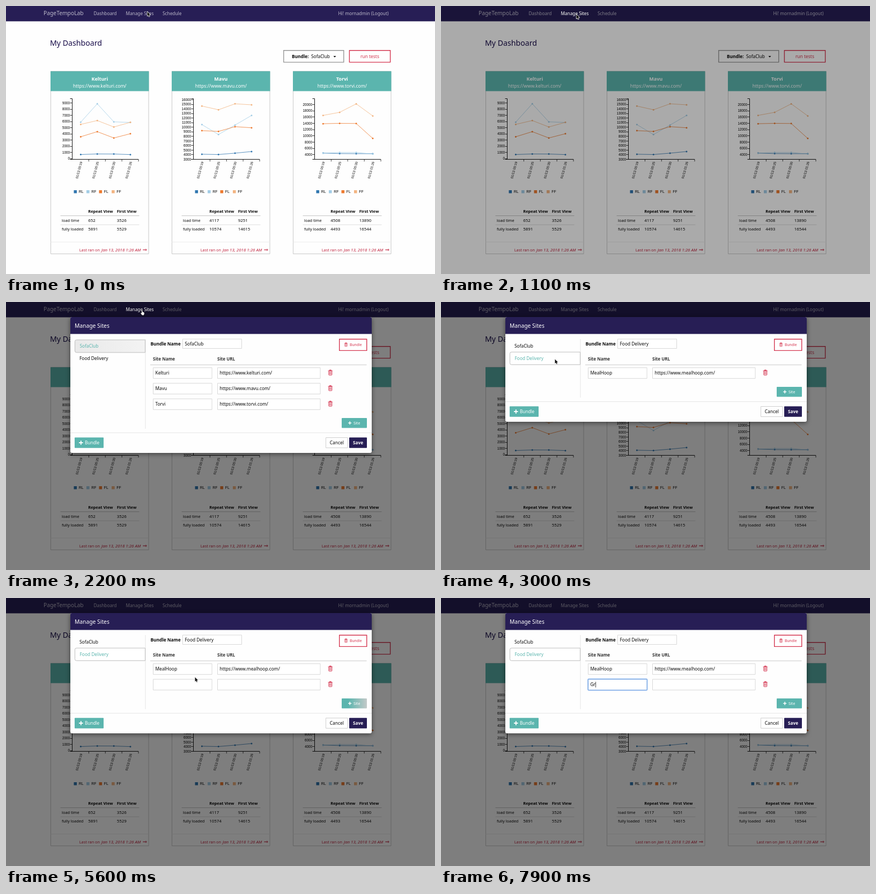
Animation, 800 px wide and 499 px high, one loop 8000 ms. Source, as an HTML page with a canvas:

```html
<!DOCTYPE html>
<html lang="en">
<head>
<meta charset="utf-8">
<title>Site dashboard</title>
<style>
  html, body { margin: 0; width: 100%; height: 100%; overflow: hidden; background: #fefefe; }
  canvas { display: block; width: 800px; height: 499px; }
</style>
</head>
<body>
<canvas id="stage"></canvas>
<script>
const W = 800, H = 499, LOOP = 8000, STEP = 100;
const NAVY = '#271e55', TEAL = '#5bb5ae', RED = '#d4344f', INK = '#080808';
const UI = '"Noto Sans", "Open Sans", sans-serif';
const CHART = '"Liberation Sans", Arial, sans-serif';
const SERIES = [['RL', '#3177b0'], ['RF', '#a3cde6'], ['FL', '#ee7b30'], ['FF', '#f3b582']];
const STAMPS = ['00:19', '00:25', '00:30', '01:26'];
const BUNDLES = [
  { name: 'SofaClub', sites: ['Kelturi', 'Mavu', 'Torvi'] },
  { name: 'Food Delivery', sites: ['MealHoop'] }
];
// Per card: tick range, the pixel row of the lowest tick, pixels per unit, four series.
const CARDS = [
  { x: 83.5, lo: 0, hi: 9000, step: 1000, base: 284, k: .0115, data: [
    [652, 740, 730, 640], [5891, 8860, 5940, 5840], [3526, 4350, 3330, 4020], [5529, 6150, 5110, 5860]] },
  { x: 309.5, lo: 3000, hi: 16000, step: 1000, base: 285.5, k: .00854, data: [
    [4117, 4050, 4350, 4700], [10574, 8410, 10470, 12570], [9251, 9090, 10120, 9885], [14615, 13810, 15110, 14885]] },
  { x: 535.5, lo: 4000, hi: 20000, step: 2000, base: 276.8, k: .00583, data: [
    [4508, 4340, 4310, 4310], [4493, 4690, 4690, 4220], [13890, 14000, 13950, 9180], [16544, 17520, 20230, 16370]] }
];
// Pointer stops: time, x, y
const PATH = [[0, 263, 10], [500, 252, 15], [2300, 252, 15], [2800, 212, 106], [3700, 212, 106],
  [4600, 647, 167], [5100, 647, 167], [5600, 352, 147], [5900, 338, 160]];

const dpr = window.devicePixelRatio || 1;
const stage = document.getElementById('stage');
const layer = document.createElement('canvas');
for (const cv of [stage, layer]) {
  cv.width = W * dpr;
  cv.height = H * dpr;
  cv.getContext('2d').scale(dpr, dpr);
}
const view = stage.getContext('2d');
let c = view;

const clamp = v => Math.max(0, Math.min(1, v));
const smooth = p => p * p * (3 - 2 * p);
const url = name => `https://www.${name.toLowerCase()}.com/`;

function text(s, x, y, size, color, font = '', align = 'left', family = UI) {
  c.font = `${font} ${size}px ${family}`;
  c.textAlign = align;
  c.textBaseline = 'alphabetic';
  c.fillStyle = color;
  c.fillText(s, x, y);
}

function line(x1, y1, x2, y2, color, width = 1) {
  c.strokeStyle = color;
  c.lineWidth = width;
  c.beginPath();
  c.moveTo(x1, y1);
  c.lineTo(x2, y2);
  c.stroke();
}

function box(x, y, w, h, fill, stroke, width = 1, radius = 0) {
  c.beginPath();
  c.roundRect(x, y, w, h, radius);
  if (fill) { c.fillStyle = fill; c.fill(); }
  if (stroke) { c.strokeStyle = stroke; c.lineWidth = width; c.stroke(); }
}

function plus(x, y, r, width) {
  line(x - r, y, x + r, y, '#fff', width);
  line(x, y - r, x, y + r, '#fff', width);
}

function trash(x, y, s = 1) {
  c.save();
  c.translate(x, y);
  c.scale(s, s);
  box(-3, -2.6, 6, 7.4, null, RED, 1, .8);
  line(-4.2, -3.2, 4.2, -3.2, RED, 1);
  box(-1.5, -4.9, 3, 1.7, null, RED, .9);
  for (const d of [-1.3, 0, 1.3]) line(d, -1.2, d, 3.4, RED, .7);
  c.restore();
}

function chart(card) {
  const ax = card.x + 40, right = ax + 123.5, gap = 123.5 / 4;
  const py = v => card.base - (v - card.lo) * card.k;
  const px = i => ax + .4 + gap * (i + .5);
  line(ax, 172.5, ax, 286, '#111');
  line(ax - 4, 172.5, ax, 172.5, '#111');
  line(ax - 4, 285.5, right, 285.5, '#111');
  for (let v = card.lo; v <= card.hi; v += card.step) {
    const y = Math.floor(py(v)) + .5;
    line(ax - 4, y, ax, y, '#111', .8);
    text(v, ax - 4.5, py(v) + 2.2, 6.3, '#000', '', 'right', CHART);
  }
  for (let i = 1; i <= 4; i++) line(ax + gap * i, 285.5, ax + gap * i, 289.5, '#111', .8);
  STAMPS.forEach((s, i) => {
    c.save();
    c.translate(px(i) + .8, 290);
    c.rotate(-75 * Math.PI / 180);
    text('01/13 ' + s, 0, 2.2, 6.1, '#000', '', 'right', CHART);
    c.restore();
  });
  SERIES.forEach(([name, color], n) => {
    const ys = card.data[n].map(py);
    c.beginPath();
    ys.forEach((y, i) => c.lineTo(px(i), y));
    c.strokeStyle = color;
    c.lineWidth = .8;
    c.stroke();
    c.fillStyle = color;
    ys.forEach((y, i) => {
      c.beginPath();
      c.arc(px(i), y, 1.5, 0, 7);
      c.fill();
    });
    const lx = card.x + 43 + n * 23.5;
    box(lx, 343, 5.6, 5.6, color);
    text(name, lx + 9.3, 348.2, 6.8, '#000', '', 'left', CHART);
  });
}

function drawCard(card, i) {
  const { x, data } = card, name = BUNDLES[0].sites[i];
  box(x, 121.5, 182.5, 340, '#fefefe', '#c8c8c8');
  box(x - .5, 121.5, 183.5, 37, TEAL);
  text(name, x + 91.3, 139, 9, '#fff', 'bold', 'center');
  text(url(name), x + 91.3, 152.2, 8.5, '#fff', '', 'center');
  chart(card);
  text('Repeat View', x + 69.7, 385, 7.5, INK, 'bold');
  text('First View', x + 123.2, 385, 7.5, INK, 'bold');
  line(x + 18, 390.5, x + 165, 390.5, '#c4c4c4');
  line(x + 18, 407.3, x + 165, 407.3, '#dedede');
  ['load time', 'fully loaded'].forEach((label, r) => {
    const y = 402 + r * 16.2;
    text(label, x + 20.5, y, 7.4, INK);
    text(data[r][0], x + 69.7, y, 7.9, INK);
    text(data[2 + r][0], x + 123.2, y, 7.9, INK);
  });
  line(x, 439.5, x + 182.5, 439.5, '#ececec');
  text('Last ran on', x + 91.5, 457, 7.3, '#c0243f', '', 'right');
  text('Jan 13, 2018 1:26 AM', x + 168, 457, 7.9, '#c0243f', 'italic', 'right');
  text('⇒', x + 171.3, 457, 10, '#c0243f', '', 'left', '"DejaVu Sans", sans-serif');
}

function drawPage() {
  box(0, 0, W, H, '#fefefe');
  box(0, 0, W, 28.4, NAVY);
  const grey = '#bcb9ca';
  text('PageTempoLab', 70, 17, 10.3, grey);
  text('Dashboard', 163.5, 16.5, 8.3, grey);
  text('Manage Sites', 223.5, 16.5, 8.25, grey);
  text('Schedule', 292, 16.5, 8.3, grey);
  text('Hi! mornadmin (Logout)', 713.5, 16.5, 8.35, grey, '', 'right');
  text('My Dashboard', 82, 74, 14.15, '#170b48');
  box(517.8, 82.8, 112, 21.8, null, '#959595', 1.4);
  text('Bundle:', 533, 97, 8.3, INK, 'bold');
  text(BUNDLES[0].name, 569, 97, 8.4, INK);
  c.beginPath();
  c.moveTo(610.5, 93);
  c.lineTo(615.5, 93);
  c.lineTo(613, 95.8);
  c.fill();
  box(640.4, 82.8, 76.2, 21.8, null, RED, 1.4);
  text('run tests', 678.4, 97, 8.45, RED, '', 'center');
  CARDS.forEach(drawCard);
}

function field(x, y, w, value, focus) {
  if (focus) box(x, y, w, 20, '#fff', '#a9c8f2', 3, 1.5);
  box(x, y, w, 20, '#fff', focus ? '#6d9fe0' : '#d8d8d8');
  text(value, x + 4, y + 13, 8.35, INK);
}

function drawModal(t) {
  const active = t < 2900 ? 0 : 1, bundle = BUNDLES[active];
  const sites = bundle.sites.slice();
  if (t >= 5000) sites.push('');
  const last = 132 + 29 * (sites.length - 1);
  const typed = t < 7300 ? '' : t < 7700 ? 'G' : 'Gr';

  c.save();
  c.shadowColor = 'rgba(0,0,0,.5)';
  c.shadowBlur = 8 * dpr;
  c.shadowOffsetY = 2 * dpr;
  box(120, 28, 562, last + 63, '#fefefe', null, 1, 3);
  c.restore();
  box(120, 28, 562, 31.5, NAVY, null, 1, [3, 3, 0, 0]);
  text('Manage Sites', 128, 47.5, 10.3, '#fff', '500');

  line(260, 69, 260, last + 46, '#e4e4e4');
  const ty = active ? 93.2 : 70.5;
  let fill = '#fff';
  if (!active) {
    fill = c.createLinearGradient(128, 0, 260, 0);
    fill.addColorStop(0, '#e9e9e9');
    fill.addColorStop(1, '#f3f3f3');
  }
  box(128.5, ty, 131, 23.5, fill, '#bdbdbd', 1, [3, 0, 0, 3]);
  BUNDLES.forEach((b, i) => {
    const on = i === active;
    text(b.name, on ? 137.5 : 137, 84.8 + i * 23.2, 8.35, on ? TEAL : INK);
  });

  text('Bundle Name', 269.5, 81, 8.3, INK, 'bold');
  box(329.5, 69, 110, 17.5, '#fff', '#d8d8d8');
  text(bundle.name, 333.5, 81, 8.35, INK);
  box(621.7, 69.2, 51, 21.2, '#fff', RED, 1.4);
  trash(634, 79.3, .72);
  text('Bundle', 641, 82, 6.8, RED);
  text('Site Name', 274, 109, 8, '#333', 'bold');
  text('Site URL', 394, 109, 8, '#333', 'bold');
  line(269, 117, 672.5, 117, '#c8c8c8');

  sites.forEach((name, i) => {
    const y = 122 + 29 * i, fresh = !name, focus = fresh && t >= 6000;
    field(274.5, y + .3, 109.5, fresh ? typed : name, focus);
    field(394.5, y + .3, 191.5, fresh ? '' : url(name));
    trash(604.8, y + 9.3);
    const blinkOn = t >= 7300 || Math.floor((t - 6000) / 500) % 2 === 0;
    if (focus && blinkOn) {
      c.font = `8.35px ${UI}`;
      const cx = 279 + c.measureText(typed).width;
      line(cx, y + 5, cx, y + 15.5, '#111', .8);
    }
  });

  let site = TEAL;
  if (t >= 4600 && t < 6000) {
    site = c.createLinearGradient(626, 0, 673, 0);
    site.addColorStop(.25, TEAL);
    site.addColorStop(1, '#c3c9c8');
  }
  box(626, last + 26, 47, 18.5, site, null, 1, 1);
  plus(641.2, last + 35.3, 3, 1.5);
  text('Site', 648, last + 38, 7.2, '#fff', '500');

  line(120, last + 53.5, 682, last + 53.5, '#e6e6e6');
  box(128, last + 62.3, 54, 19.5, TEAL, null, 1, 1);
  plus(139.8, last + 72, 3.8, 1.9);
  text('Bundle', 147, last + 75, 8.2, '#fff', '500');
  box(596.5, last + 62.5, 40.5, 19, '#fff', '#cfcfcf');
  text('Cancel', 616.8, last + 75, 8.4, INK, '', 'center');
  box(640, last + 62.3, 33, 19.5, NAVY, null, 1, 1);
  text('Save', 656.5, last + 75, 8.2, '#fff', 'bold', 'center');
}

function pointerAt(t) {
  let i = PATH.length - 1;
  while (PATH[i][0] > t) i--;
  const a = PATH[i], b = PATH[i + 1] || a;
  const p = b === a ? 0 : smooth((t - a[0]) / (b[0] - a[0]));
  return [a[1] + (b[1] - a[1]) * p, a[2] + (b[2] - a[2]) * p];
}

function outline(points, fill, edge, width) {
  c.beginPath();
  for (let i = 0; i < points.length; i += 2) c.lineTo(points[i], points[i + 1]);
  c.closePath();
  c.lineJoin = 'round';
  c.strokeStyle = edge;
  c.lineWidth = width;
  c.stroke();
  c.fillStyle = fill;
  c.fill();
}

function drawPointer(t) {
  if (t >= 7200) return;
  const [x, y] = pointerAt(t);
  c.save();
  c.translate(x, y);
  if (t >= 5900) {
    line(0, -4.5, 0, 4.5, '#222', .9);
    line(-1.8, -4.8, 1.8, -4.8, '#222', .8);
    line(-1.8, 4.8, 1.8, 4.8, '#222', .8);
  } else if ((t >= 1200 && t < 2400) || (t >= 4500 && t < 5200)) {
    outline([1, 0, 2.2, 0, 2.6, 3.6, 5.6, 4.6, 5.8, 7, 4.8, 9.5, 1.8, 9.5, -.8, 6, 0, 5, 1.2, 6],
      '#fff', '#111', 1.2);
  } else {
    outline([.5, .5, .5, 8.5, 2.3, 6.9, 3.6, 9.8, 4.9, 9.2, 3.7, 6.4, 6.1, 6.3], '#111', '#fff', 1.4);
  }
  c.restore();
}

function draw(t) {
  c = view;
  drawPage();
  const dim = .5 * clamp((t - 1000) / 150);
  if (dim) box(0, 0, W, H, `rgba(0,0,0,${dim})`);
  if (t >= 500 && t < 2400) text('Manage Sites', 223.5, 16.5, 8.25, dim ? '#dcdce0' : '#fff');

  const shown = clamp((t - 1260) / 150);
  if (shown) {
    c = layer.getContext('2d');
    c.clearRect(0, 0, W, H);
    const rest = Math.pow(1 - clamp((t - 1260) / 300), 1.7);
    c.save();
    c.translate(0, -66 * rest);
    drawModal(t);
    c.restore();
    c = view;
    c.globalAlpha = shown;
    c.drawImage(layer, 0, 0, W, H);
    c.globalAlpha = 1;
  }
  drawPointer(t);
}

const start = performance.now();
function tick() {
  const t = (performance.now() - start) % LOOP;
  draw(Math.floor(t / STEP) * STEP);
  requestAnimationFrame(tick);
}
tick();
</script>
</body>
</html>
```
